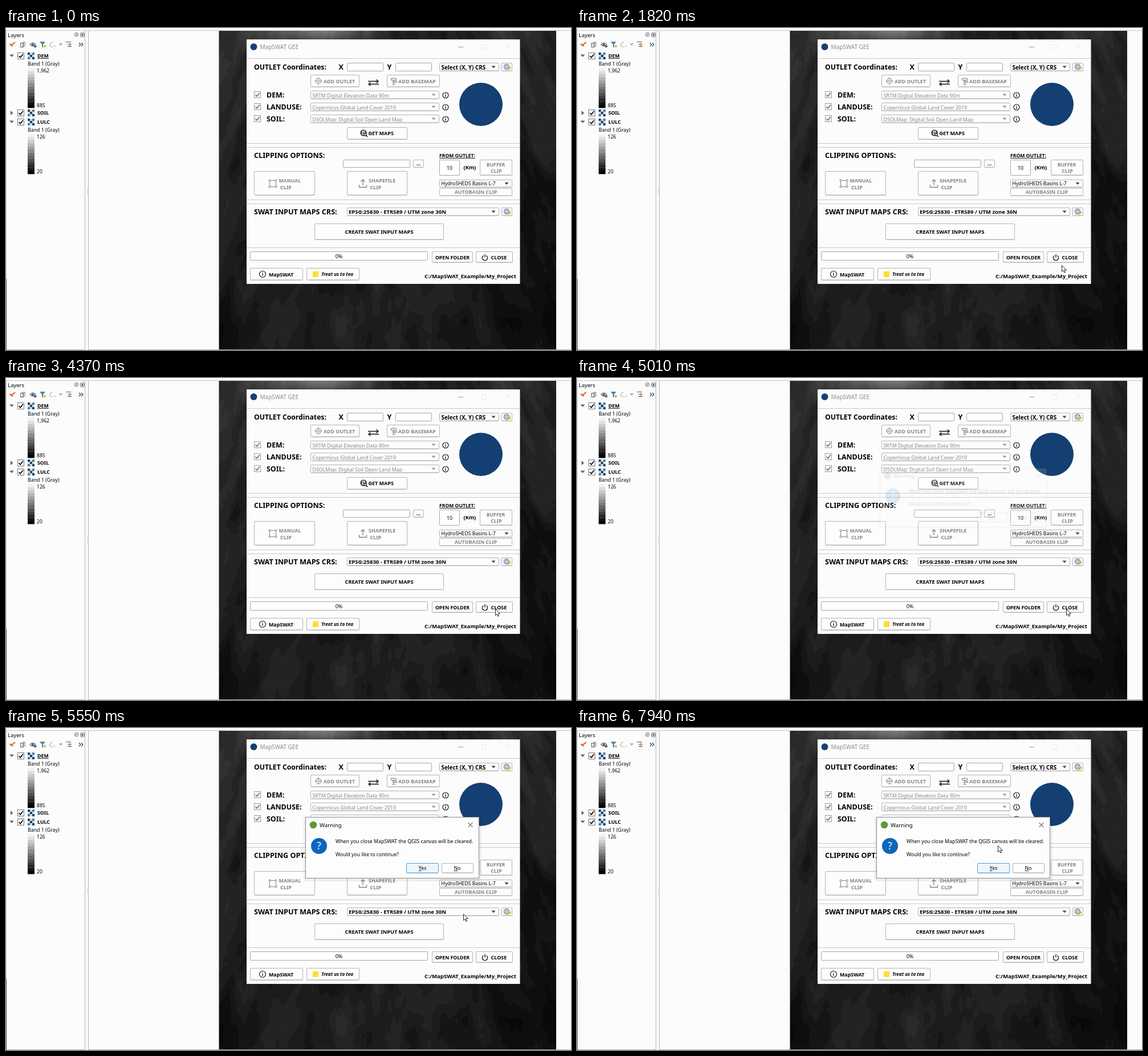
Recreate the animation shown at these times as an HTML page with a canvas. Size 991 by 565 pixels, loop 8000 ms.

```html
<!DOCTYPE html>
<html lang="en">
<head>
<meta charset="utf-8">
<title>Close dialog</title>
<style>
html, body { margin: 0; width: 100%; height: 100%; overflow: hidden; background: #fcfcfc; }
#terrain { position: absolute; left: 374px; top: 5px; }
#stage { position: absolute; left: 0; top: 0; width: 991px; height: 565px; }
text { font-family: "Noto Sans", sans-serif; white-space: pre; }
#dialog { transform-origin: 678px 210.5px; }
</style>
</head>
<body>
<canvas id="terrain" width="591" height="559"></canvas>
<svg id="stage" viewBox="0 0 991 565">
  <g id="panel"></g>
  <g id="win"></g>
  <g id="dialog" opacity="0"></g>
  <path id="cursor" d="M.5 .5V11.6L3 9.2L4.8 13.2L6.6 12.4L4.9 8.5H8.2Z" fill="#fff" stroke="#111" stroke-width=".9"/>
</svg>
<script>
const $ = id => document.getElementById(id);
const LOOP = 8000, GREY = '#858585';

// ---- drawing helpers; text is placed by the middle of its capitals ----
const text = (x, y, s, size = 8.8, attr = '') =>
  `<text x="${x}" y="${y + size * .357}" font-size="${size}" ${attr}>${s}</text>`;
const bold = (x, y, s, size = 9, attr = '') => text(x, y, s, size, 'font-weight="700" ' + attr);
const rect = (x, y, w, h, fill, stroke = 'none', r = 0) =>
  `<rect x="${x}" y="${y}" width="${w}" height="${h}" rx="${r}" fill="${fill}" stroke="${stroke}"/>`;
const line = (d, color = '#111', w = 1) =>
  `<path d="${d}" fill="none" stroke="${color}" stroke-width="${w}"/>`;
const fill = (d, color) => `<path d="${d}" fill="${color}"/>`;
const dot = (x, y, r, color, stroke = 'none', w = 1) =>
  `<circle cx="${x}" cy="${y}" r="${r}" fill="${color}" stroke="${stroke}" stroke-width="${w}"/>`;
const mid = 'text-anchor="middle" ';
const grey = `fill="${GREY}" `;

const button = (x, y, w, h, border = '#b4b4b4', face = '#fdfdfd') =>
  rect(x + .5, y + .5, w - 1, h - 1, face, border, 1.5) +
  line(`M${x + 2} ${y + h - 1.5}h${w - 4}`, '#d9d9d9');
const field = (x, y, w, h) => rect(x + .5, y + .5, w - 1, h - 1, '#fff', '#a5a5a5', 1);
const down = (x, y, color) => fill(`M${x - 3.5} ${y - 2}h7l-3.5 4z`, color);
const combo = (x, y, w, h, color = '#444') => button(x, y, w, h) + down(x + w - 10, y + h / 2, color);
const info = (x, y, r = 5) => dot(x, y, r, '#fff', '#111', 1.2) +
  line(`M${x} ${y - .8}v3.6`, '#111', 1.4) + dot(x, y - 2.5, .8, '#111');
const check = (x, y, border, tick) => rect(x + .5, y + .5, 11, 11, '#fff', border) +
  line(`M${x + 2.5} ${y + 6}l2.7 2.8l4.6 -6`, tick, 1.8);
const globeButton = y => button(869, y, 19, 15) + dot(878, y + 7, 4.8, '#9fb6c8', '#72889a') +
  line(`M873.5 ${y + 7}h9M878 ${y + 2.5}v9`, '#dde7ee', .8) +
  fill(`M879 ${y + 13}l1 -3l4 -3l2 2l-4 3z`, '#e2b21d');

// ---- layers panel ----
function ramp(y) {
  let s = '';
  for (let i = 0; i < 13; i++) {
    const c = Math.round(242 * (1 - i / 12));
    s += rect(38, y + i * 5.4, 12, 5.6, `rgb(${c},${c},${c})`);
  }
  return s;
}
function layer(y, name, open, attr = '') {
  let s = open ? fill(`M6 ${y - 2.5}h8l-4 4.5z`, '#666') : fill(`M8 ${y - 4}v8l4.5 -4z`, '#666');
  s += check(20, y - 6, '#777', '#111') + rect(38, y - 6, 12, 12, '#cfdfe9');
  for (let i = 0; i < 9; i++)
    if (i % 2 === 0) s += rect(38 + i % 3 * 4, y - 6 + (i / 3 | 0) * 4, 4, 4, i % 4 ? '#4d7fa6' : '#1d4266');
  return s + bold(55, y, name, 8.8, attr);
}
$('panel').innerHTML =
  line('M0 4.5H991', '#c4c4c4') + line('M138.5 5V564M144.5 5V564M0 564.5H139M144 564.5H991', '#b5b5b5') +
  line('M373.5 5V564', '#8c8c8c') + line('M.5 5V440', '#d0d0d0') + line('M.5 440V565', '#555') +
  line('M142.5 279V292', '#d4d4d4') +
  text(3, 13, 'Layers', 9.5) +
  rect(120.5, 8.5, 6, 6, 'none', '#666', 2) + line('M122 13l3 -3') +
  rect(130.5, 8.5, 7, 7, 'none', '#666', 2) + line('M132 10l4 4m0 -4l-4 4') +
  line('M6 28l4 3', '#e8b22c', 2.4) + line('M8 28l4 4M11 29l5 -4', '#e0562f', 2.2) +
  rect(25.5, 26.5, 5, 7, '#e8e8e8', '#666') + line('M30 33v-8h3v8', '#666') +
  line('M42 29q5 -6 10 0q-5 5 -10 0', '#476075', 1.2) + dot(47, 29, 2, '#3b5a75') + down(51, 33, '#555') +
  fill('M59 24h10l-4 5v5h-2v-5z', '#4d84b8') + rect(66, 30, 4, 4, '#e3bd39') +
  line('M82 25q-5 0 -4 3q-4 3 2 5h3M84 32h4', '#b5b5b5', 1.2) + down(96, 29, '#aaa') +
  line('M105 24.5h9M108 28.5h7M108 32.5h7', '#557', 1.2) + line('M112 26v7m-2 -2l2 2l2 -2', '#d9862f', 1.3) +
  line('M128 26l3 3l-3 3M132 26l3 3l-3 3', '#333', 1.1) +
  layer(49, 'DEM', true, 'text-decoration="underline"') + text(38, 63, 'Band 1 (Gray)') +
  ramp(70) + text(54, 75, '1,962', 8.6) + text(54, 136, '885', 8.6) +
  layer(149, 'SOIL', false) + layer(165, 'LULC', true) + text(38, 179, 'Band 1 (Gray)') +
  ramp(186) + text(54, 191, '126', 8.6) + text(54, 252, '20', 8.6);

// ---- main window ----
const source = (y, label, value) => check(435, y - 7, '#9a9a9a', '#777') + bold(457, y, label, 12.4) +
  combo(534, y - 8, 226, 15, '#999') + text(537.5, y + .5, value, 8.8, grey) + info(771, y);

$('win').innerHTML =
  rect(422, 20, 479.5, 429, '#fcfcfc') +
  line('M422 53.5H901M422 202.5H901M422 209.5H901M422 301.5H901M422 308.5H901M422 385.5H901', '#c9c9c9') +
  dot(434.5, 33, 6, '#17406f') + text(445.5, 33.5, 'MapSWAT GEE', 10, 'fill="#8c8c8c"') +
  line('M793 33.5h9', '#999') + rect(834.5, 29.5, 8, 8, 'none', '#ececec') +
  line('M876 29l8 8m0 -8l-8 8', '#e9e9e9') +

  bold(435, 69, 'OUTLET Coordinates:', 12.2) + bold(583.5, 69, 'X', 12.6) + bold(668.5, 69, 'Y', 12.6) +
  field(598, 61, 64, 15) + field(683, 61, 64, 15) +
  combo(760, 61, 105, 15) + bold(763.5, 69, 'Select (X, Y) CRS', 9.9) + globeButton(61) +
  button(534, 82, 86, 22) + dot(548, 93, 4.5, 'none', GREY, 1.2) + dot(548, 93, 1.8, 'none', GREY) +
  line('M548 86.5v3M548 96.5v3M541.5 93h3M551.5 93h3', GREY) + bold(557, 93.5, 'ADD OUTLET', 8.8, grey) +
  line('M635 93.5h17M637 98.5h17', '#111', 1.5) + line('M649.5 90.5l3.5 3l-3.5 3M639.5 95.5l-3.5 3l3.5 3', '#111', 1.4) +
  button(668, 82, 93, 22) + line('M680 87v12M677 99h6', GREY, 1.2) +
  rect(675.5, 88.5, 9, 3, '#fff', GREY) + rect(678.5, 93.5, 7, 2, '#fff', GREY) +
  bold(688, 93.5, 'ADD BASEMAP', 9.2, grey) +
  source(118, 'DEM:', 'SRTM Digital Elevation Data 90m') +
  source(139, 'LANDUSE:', 'Copernicus Global Land Cover 2019') +
  source(160, 'SOIL:', 'DSOLMap: Digital Soil Open Land Map') +
  button(598, 174, 106, 22) + dot(627, 184, 5, 'none', '#111', 1.2) +
  line('M622 184h10M627 179v10M624.5 180q-2 4 0 8M629.5 180q2 4 0 8', '#111', .8) +
  dot(630, 187, 2, '#fff', '#111', 1.2) + line('M631.5 188.5l2.5 2.5', '#111', 1.4) +
  bold(635.5, 185, 'GET MAPS', 9) +
  dot(833, 134, 38, '#143f72') +

  bold(435, 224, 'CLIPPING OPTIONS:', 12.6) + field(591, 231, 118, 14) +
  button(714, 231, 19, 14) + bold(723.5, 238, '...', 9, mid) +
  bold(760, 224, 'FROM OUTLET:', 8.6, 'text-decoration="underline"') +
  field(760, 231, 36, 28) + text(778, 246, '10', 8.8, mid) + bold(802.5, 245, '(Km)', 9.4) +
  button(831, 231, 57, 28) + bold(859, 240, 'BUFFER', 8.7, mid + grey) + bold(860, 251, 'CLIP', 8.9, mid + grey) +
  button(435, 251, 107, 43) + rect(462.5, 267.5, 11, 11, 'none', GREY) +
  [[461, 266], [472, 266], [461, 277], [472, 277]].map(p => rect(p[0], p[1], 3, 3, '#fff', GREY, 1)).join('') +
  bold(478.5, 268, 'MANUAL', 8.7, grey) + bold(481, 280, 'CLIP', 9, grey) +
  button(598, 251, 106, 43) + line('M619.5 275v4.5h13V275M626 276v-10m-3.5 3.5l3.5 -3.5l3.5 3.5', GREY, 1.3) +
  bold(636, 268, 'SHAPEFILE', 9, grey) + bold(638.5, 280, 'CLIP', 9, grey) +
  combo(760, 266, 128, 14) + text(763.5, 273, 'HydroSHEDS Basins L-7', 8.7) +
  button(760, 281, 128, 14) + bold(824, 288, 'AUTOBASIN CLIP', 8.9, mid + grey) +

  bold(435, 323, 'SWAT INPUT MAPS CRS:', 12.6) + combo(598, 315, 267, 15) +
  bold(601, 323, 'EPSG:25830 - ETRS89 / UTM zone 30N', 9.5) + globeButton(315) +
  button(541, 343, 227, 29) + bold(654.5, 358, 'CREATE SWAT INPUT MAPS', 9.2, mid) +
  field(428, 392, 312, 16) + text(584, 401, '0%', 9, mid) +
  button(747, 392, 72, 20) + bold(783, 403, 'OPEN FOLDER', 8.7, mid) +
  button(824, 392, 65, 20) + line('M837.3 399.5a4.6 4.6 0 1 0 5.4 0M840 397v5.5', '#111', 1.3) +
  bold(850.5, 403, 'CLOSE', 9) +
  button(428, 421, 93, 22) + info(450, 432, 5.5) + bold(461, 432.5, 'MapSWAT', 8.9) +
  button(527, 421, 93, 22) + rect(538, 427, 10, 10, '#ffdd33') +
  text(553, 432, 'Treat us to tea', 8.2, 'font-style="italic" font-weight="600"') +
  bold(895, 436, 'C:/MapSWAT_Example/My_Project', 9.65, 'text-anchor="end"');

// ---- message box ----
const key = (s, rest) => `<tspan text-decoration="underline">${s}</tspan>${rest}`;
$('dialog').innerHTML =
  '<rect x="522" y="157" width="312" height="112" rx="4" opacity=".06"/>' +
  rect(525.5, 156.5, 304, 107, '#fdfdfd', '#8a8a8a') +
  dot(539, 170, 6.3, '#5d9a36') + text(550, 170.5, 'Warning', 9.7) +
  line('M810.5 166l8 8m0 -8l-8 8', '#222') +
  dot(549, 207, 14, '#0a67bb') + text(549, 207, '?', 18, mid + 'fill="#fff"') +
  text(578, 199, 'When you close MapSWAT the QGIS canvas will be cleared.') +
  text(578, 221.5, 'Would you like to continue?', 8.6) +
  button(702, 237, 57, 18, '#4a9fe0', '#eef6fc') +
  text(730.5, 246, key('Y', 'es'), 8.8, mid) +
  button(764, 237, 56, 18) + text(791.5, 246, key('N', 'o'), 8.8, mid);

// ---- terraced elevation raster ----
function noise(x, y) {
  const hash = (a, b) => { const v = Math.sin(a * 127.1 + b * 311.7) * 43758.5453; return v - Math.floor(v); };
  const i = Math.floor(x), j = Math.floor(y), ease = v => v * v * (3 - 2 * v);
  const u = ease(x - i), w = ease(y - j);
  const top = hash(i, j) * (1 - u) + hash(i + 1, j) * u;
  const low = hash(i, j + 1) * (1 - u) + hash(i + 1, j + 1) * u;
  return top * (1 - w) + low * w;
}
function paintTerrain() {
  const { width, height } = $('terrain');
  const ctx = $('terrain').getContext('2d'), img = ctx.createImageData(width, height);
  // x, y, width, height, amount of each rise or hollow
  const hills = [[555, 4, 85, 20, 85], [440, 4, 50, 30, 20], [870, 6, 60, 50, 22], [390, 60, 60, 150, 14],
    [940, 130, 60, 90, 10], [960, 520, 110, 130, -18], [380, 540, 40, 90, -16], [930, 290, 50, 50, -14], [620, 470, 160, 60, 4]];
  for (let py = 0; py < height; py++) for (let px = 0; px < width; px++) {
    const x = px + 374, y = py + 5, u = 650 + (x - 650) * 420 / (260 + y * .45);
    const f = noise(u / 26, y / 75) * .6 + noise(u / 11 + 9, y / 30) * .28 + noise(u / 5, y / 9) * .12;
    let v = 28 + (f - .5) * 30;
    for (const [hx, hy, w, h, a] of hills) v += a * Math.exp(-(((x - hx) / w) ** 2) - ((y - hy) / h) ** 2);
    v = Math.max(9, Math.round(v / 7) * 7);
    img.data.set([v, v, v, 255], (py * width + px) * 4);
  }
  ctx.putImageData(img, 0, 0);
}
paintTerrain();

// ---- motion: each leg is start time, number of 120 ms steps, way points ----
const legs = [
  [500, 7, [[880, 2], [868, 30], [826, 65], [780, 110], [745, 150], [722, 178], [715, 190]]],
  [1340, 7, [[660, 225], [611, 262], [640, 320], [739, 392], [850, 416], [876, 419], [882, 413]]],
  [2180, 7, [[870, 405], [838, 390], [826, 402], [850, 416], [886, 418]]],
  [3020, 5, [[879, 412], [860, 400], [836, 392], [850, 408]]],
  [3650, 7, [[838, 414], [862, 421], [876, 410], [858, 405]]],
  [5410, 1, [[857, 389]]],
  [5550, 1, [[802, 326]]],
  [5700, 4, [[768, 296], [722, 264], [702, 253], [717, 251]]],
  [6210, 7, [[722, 248], [734, 250], [727, 244]]],
  [7050, 3, [[750, 232], [678, 212], [588, 207]]],
  [7550, 2, [[612, 206], [651, 205]]],
  [7820, 2, [[696, 205], [738, 206]]]
];
function cursorAt(t) {
  const leg = legs.filter(l => l[0] <= t).pop();
  if (!leg) return null;
  const [start, steps, pts] = leg;
  const k = Math.min(steps - 1, Math.floor((t - start) / 120));
  const f = steps > 1 ? k / (steps - 1) * (pts.length - 1) : 0;
  const a = pts[Math.floor(f)], b = pts[Math.ceil(f)], m = f % 1;
  return [a[0] + (b[0] - a[0]) * m, a[1] + (b[1] - a[1]) * m].map(Math.round);
}
function dialogAt(t) {
  if (t < 5010) return [0, .95];
  if (t < 5130) return [.12, .96];
  return t < 5270 ? [.85, .99] : [1, 1];
}
const t0 = performance.now();
function draw() {
  const t = (performance.now() - t0) % LOOP;
  const p = cursorAt(t), [alpha, scale] = dialogAt(t);
  $('cursor').setAttribute('visibility', p ? 'visible' : 'hidden');
  if (p) $('cursor').setAttribute('transform', `translate(${p})`);
  $('dialog').setAttribute('opacity', alpha);
  $('dialog').style.transform = `scale(${scale})`;
  requestAnimationFrame(draw);
}
draw();
</script>
</body>
</html>
```
